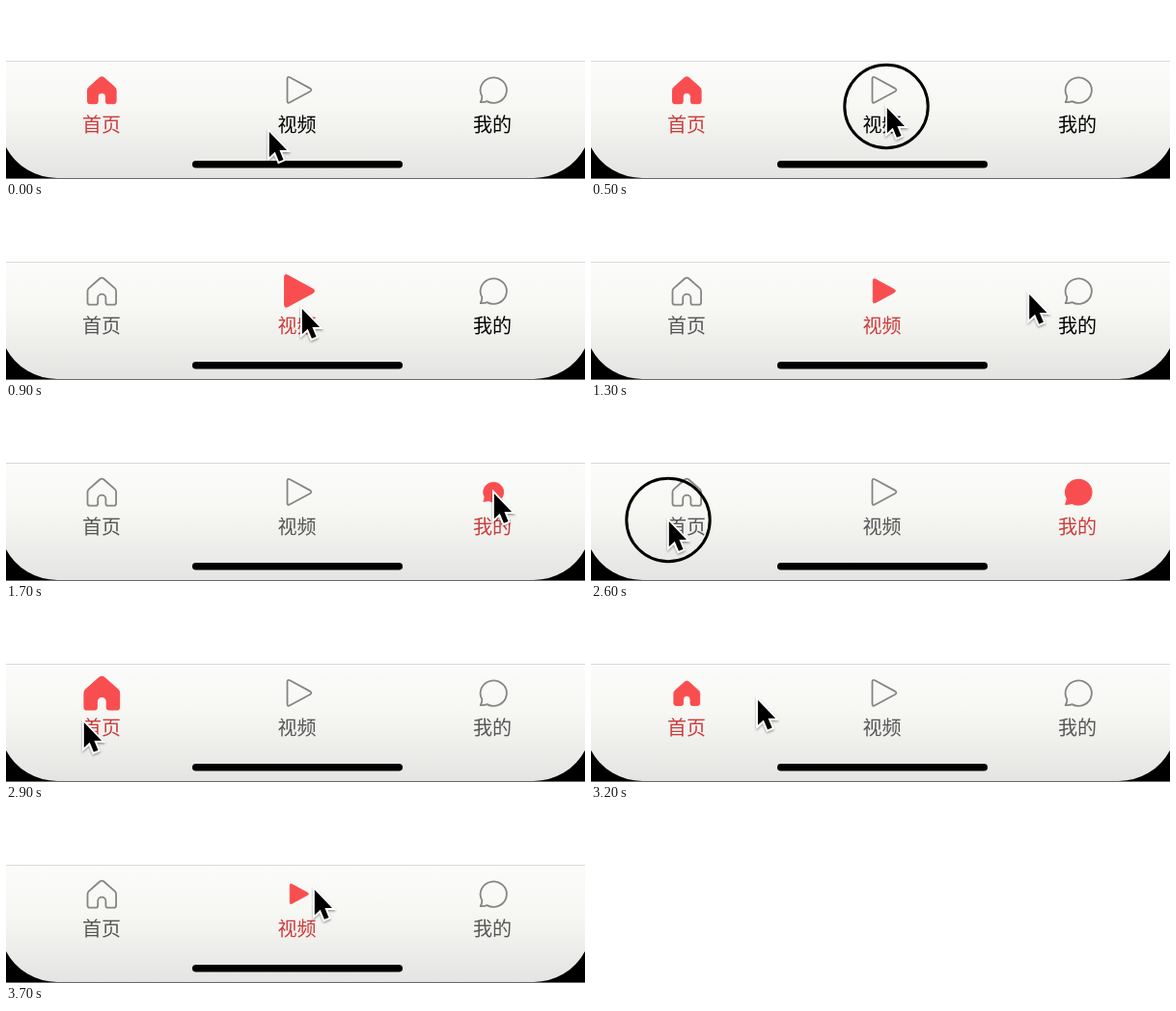
An HTML page that plays this animation: 600x180 px, repeating every 3800 ms.

```html
<!DOCTYPE html>
<html lang="zh-CN">
<head>
<meta charset="utf-8">
<style>
html, body { margin: 0; width: 100%; height: 100%; overflow: hidden; background: #fff }
svg { display: block }
text { font: 20px "Noto Sans CJK SC", "Noto Sans CJK", sans-serif; text-anchor: middle }
.icon { stroke-linejoin: round }
</style>
</head>
<body>
<svg width="600" height="180" viewBox="0 0 600 180">
  <defs>
    <linearGradient id="bar" x2="0" y2="1">
      <stop stop-color="#fbfbfa"/><stop offset=".4" stop-color="#f7f7f4"/><stop offset="1" stop-color="#e4e5e2"/>
    </linearGradient>
    <filter id="shadow" x="-50%" y="-50%" width="200%" height="200%">
      <feDropShadow dx="0" dy="1.5" stdDeviation="1.3" flood-opacity=".4"/>
    </filter>
  </defs>
  <rect y="120" width="600" height="60"/>
  <path d="M0 57H600V147A60 60 0 0 1 547 179H53A60 60 0 0 1 0 147Z" fill="url(#bar)"/>
  <rect y="57" width="600" height="1" fill="#d9d9dc"/>
  <rect y="179" width="600" height="1" fill="#666"/>
  <rect x="193" y="161" width="218" height="7.5" rx="3.75"/>
  <g id="tabs"></g>
  <circle id="press" r="43.2" fill="none" stroke="#000" stroke-width="3"/>
  <path id="cursor" d="M0 0V26.2L5.9 20.8L10.1 30.8L14.7 28.9L10.6 19.1H18.2Z"
    stroke="#fff" stroke-width="3.6" paint-order="stroke" filter="url(#shadow)"/>
</svg>
<script>
const LOOP = 3800, STEP = 100;
const RED = '#f84e4f', RED_TEXT = '#cb3b3a', GRAY_TEXT = '#555';
const PERIOD = 1000, LEAD = 300, HOLD = 200;

// Icon paths are centred on their own origin.
const tabs = [
  { x: 99, label: '首页', cx: 99.3, cy: 87.7,
    d: 'M-2.2-13.2Q0-14.8 2.2-13.2L13.6-3Q14.8-1.8 14.8 0V11.5Q14.8 14 12.3 14H6.3Q4.1 14 4.1 11.8V7A4.1 4.1 0 0 0-4.1 7V11.8Q-4.1 14-6.3 14H-12.3Q-14.8 14-14.8 11.5V0Q-14.8-1.8-13.6-3Z' },
  { x: 301.5, label: '视频', cx: 303.5, cy: 87.3,
    d: 'M-12-11.5Q-12-14.4-9.3-13L11.5-1.7Q14.2 0 11.5 1.7L-9.3 13Q-12 14.4-12 11.5Z' },
  { x: 504, label: '我的', cx: 505, cy: 87.3,
    d: 'M-11.8 6.5A13.6 13.2 0 1 1-6.5 11.8Q-9 13-13.3 12.8Q-11.5 10-11.8 6.5Z' }
];

// Cursor moves: start time, end time, destination.
const moves = [
  [0, 0, 272, 129], [0, 400, 306, 104], [1100, 1400, 505, 87],
  [1700, 2100, 37, 116], [2100, 2400, 80, 116], [2980, 3500, 319, 81]
];

const smooth = u => u * u * (3 - 2 * u);
const easeOut = u => 1 - (1 - u) ** 2;
const bounce = age => 1 + .3 * Math.exp(-((age / 500) ** 2)) * Math.sin((age - 85) / 100);

function cursorAt(t) {
  let x = 0, y = 0;
  for (const [start, end, toX, toY] of moves) {
    if (t < start) break;
    const u = Math.min(1, (t - start) / (end - start || 1) + (start === end));
    x += (toX - x) * smooth(u);
    y += (toY - y) * easeOut(u);
  }
  return [x, y];
}

function set(el, attrs) {
  for (const k in attrs) el.setAttribute(k, attrs[k]);
}
function add(parent, tag, attrs) {
  const el = document.createElementNS('http://www.w3.org/2000/svg', tag);
  set(el, attrs);
  return parent.appendChild(el);
}

const group = document.getElementById('tabs');
const press = document.getElementById('press');
const cursor = document.getElementById('cursor');
for (const tab of tabs) {
  tab.icon = add(group, 'path', { d: tab.d, class: 'icon' });
  tab.text = add(group, 'text', { x: tab.x, y: 131 });
  tab.text.textContent = tab.label;
}

function draw() {
  const t = Math.floor(performance.now() % LOOP / STEP) * STEP;
  const clicks = Math.floor((t + LEAD) / PERIOD), age = (t + LEAD) % PERIOD;
  tabs.forEach((tab, i) => {
    const on = i === clicks % tabs.length;
    const scale = on && clicks ? bounce(age) : 1;
    set(tab.icon, {
      transform: `translate(${tab.cx} ${tab.cy}) scale(${scale})`,
      fill: on ? RED : 'none',
      stroke: on ? RED : '#858585',
      'stroke-width': on ? 1 : 1.8
    });
    // Labels stay black until their tab has been selected once.
    set(tab.text, { fill: on ? RED_TEXT : i <= clicks ? GRAY_TEXT : '#000' });
  });
  const [x, y] = cursorAt(t);
  set(cursor, { transform: `translate(${x + .8} ${y + 2})` });
  set(press, { cx: x, cy: y + .5, visibility: age >= PERIOD - HOLD ? 'visible' : 'hidden' });
  requestAnimationFrame(draw);
}
draw();
</script>
</body>
</html>
```
